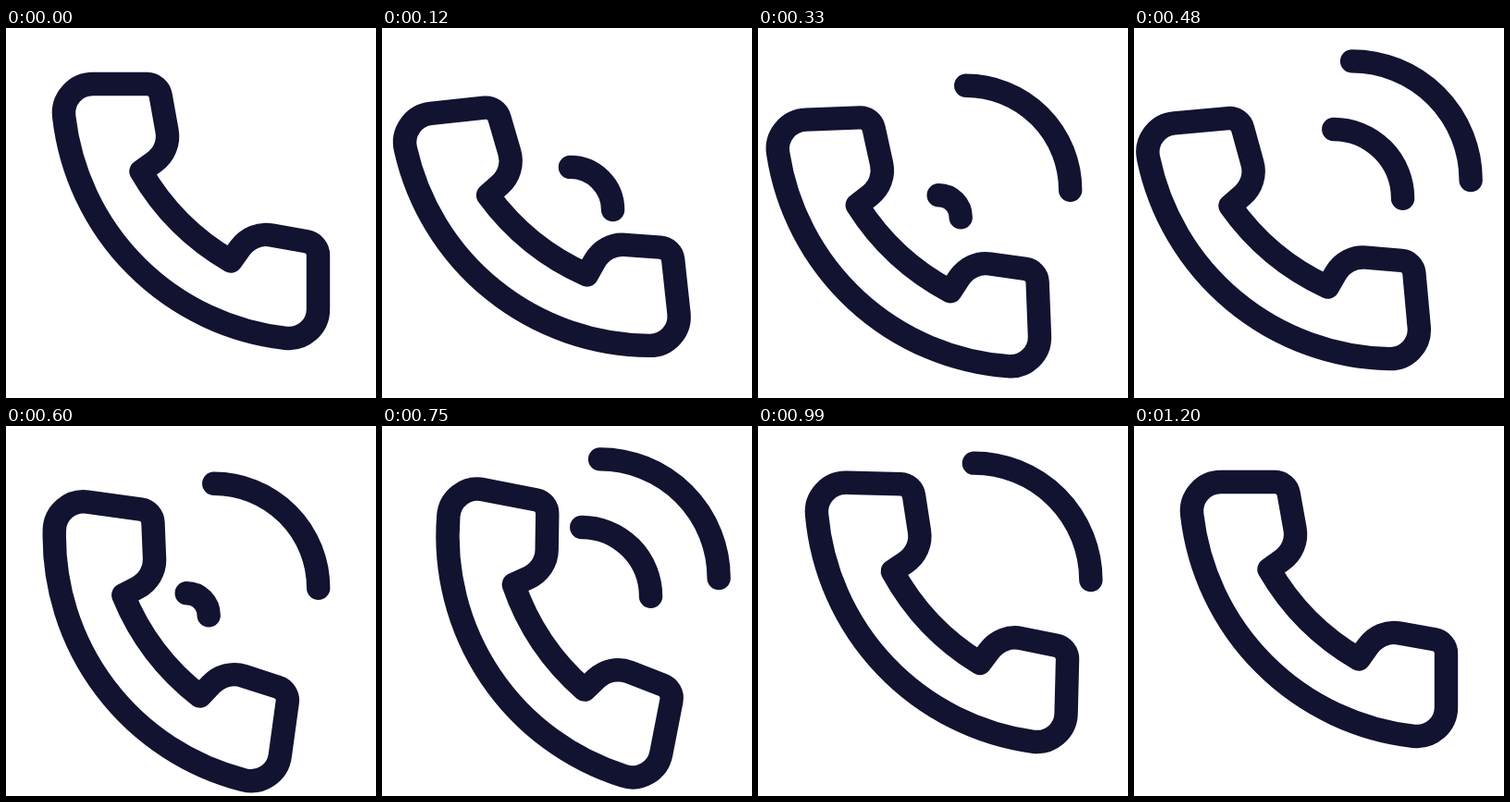
An HTML page for the animation above (2230 ms loop, 400 px wide and 400 px high).

```html
<!DOCTYPE html>
<html lang="en">
<head>
<meta charset="utf-8">
<title>Ringing phone</title>
<style>
  html, body { margin: 0; width: 100%; height: 100%; overflow: hidden; background: #fff; }
  svg { display: block; width: 100%; height: 100%; }
  path { fill: none; stroke: #121331; stroke-width: 25.4; stroke-linecap: round; stroke-linejoin: round; }
</style>
</head>
<body>
<svg viewBox="0 0 400 400">
  <path id="phone" d="M94 60.500H152.500A15 15 0 0 1 167.200 73L174 111C176.500 124 171 137 160 145L146 155
    A265 265 0 0 0 243 252L253 238C261 227 274 221.500 287 224L325 230.800A15 15 0 0 1 337.500 245.500V304
    A31.500 31.500 0 0 1 302.200 335.300A272 272 0 0 1 62.700 95.800A31.500 31.500 0 0 1 94 60.500Z"/>
  <path class="wave"/>
  <path class="wave"/>
  <path class="wave"/>
</svg>
<script>
const LOOP = 2230, STEP = 30, MOVE_END = 1200;
const WAVE_GAP = 270, WAVE_LIFE = 570;
const SHIFT = 36, SHIFT_PEAK = 410, SHIFT_END = 1110;

// Turning points of the shake: [ms, degrees]
const swings = [[0, 0], [110, -6.6], [205, 10.2], [410, -8.4], [680, 11.9], [1080, 0]];

const phone = document.getElementById("phone");
const waves = document.querySelectorAll(".wave");

const ease = u => (1 - Math.cos(Math.PI * u)) / 2;

function tilt(t) {
  const i = swings.findIndex(s => s[0] > t);
  if (i < 0) return 0;
  const [t0, a0] = swings[i - 1], [t1, a1] = swings[i];
  return a0 + (a1 - a0) * ease((t - t0) / (t1 - t0));
}

// Quick push towards the lower left, then a slow return.
function shift(t) {
  if (t < SHIFT_PEAK) return SHIFT * (1 - (1 - t / SHIFT_PEAK) ** 3);
  return SHIFT * ease(Math.max(0, SHIFT_END - t) / (SHIFT_END - SHIFT_PEAK));
}

// Quarter circle that grows fast, then slowly, while drifting to the upper right.
function wavePath(age) {
  if (age < STEP || age > WAVE_LIFE) return "";
  const r = Math.min(0.4 * age, 8 + 0.318 * age, 94.5 + 0.071 * age);
  const c = Math.min(187 + 0.137 * age, 201 + 0.072 * age);
  return `M${c} ${400 - c - r}A${r} ${r} 0 0 1 ${c + r} ${400 - c}`;
}

function draw(now) {
  const t = Math.min(MOVE_END, Math.floor(now % LOOP / STEP) * STEP);
  const s = shift(t);
  phone.setAttribute("transform", `translate(${-s} ${s}) rotate(${tilt(t)} 166 232)`);
  waves.forEach((wave, i) => wave.setAttribute("d", wavePath(t - i * WAVE_GAP)));
}

const start = performance.now();
function tick() {
  draw(performance.now() - start);
  requestAnimationFrame(tick);
}
tick();
</script>
</body>
</html>
```
